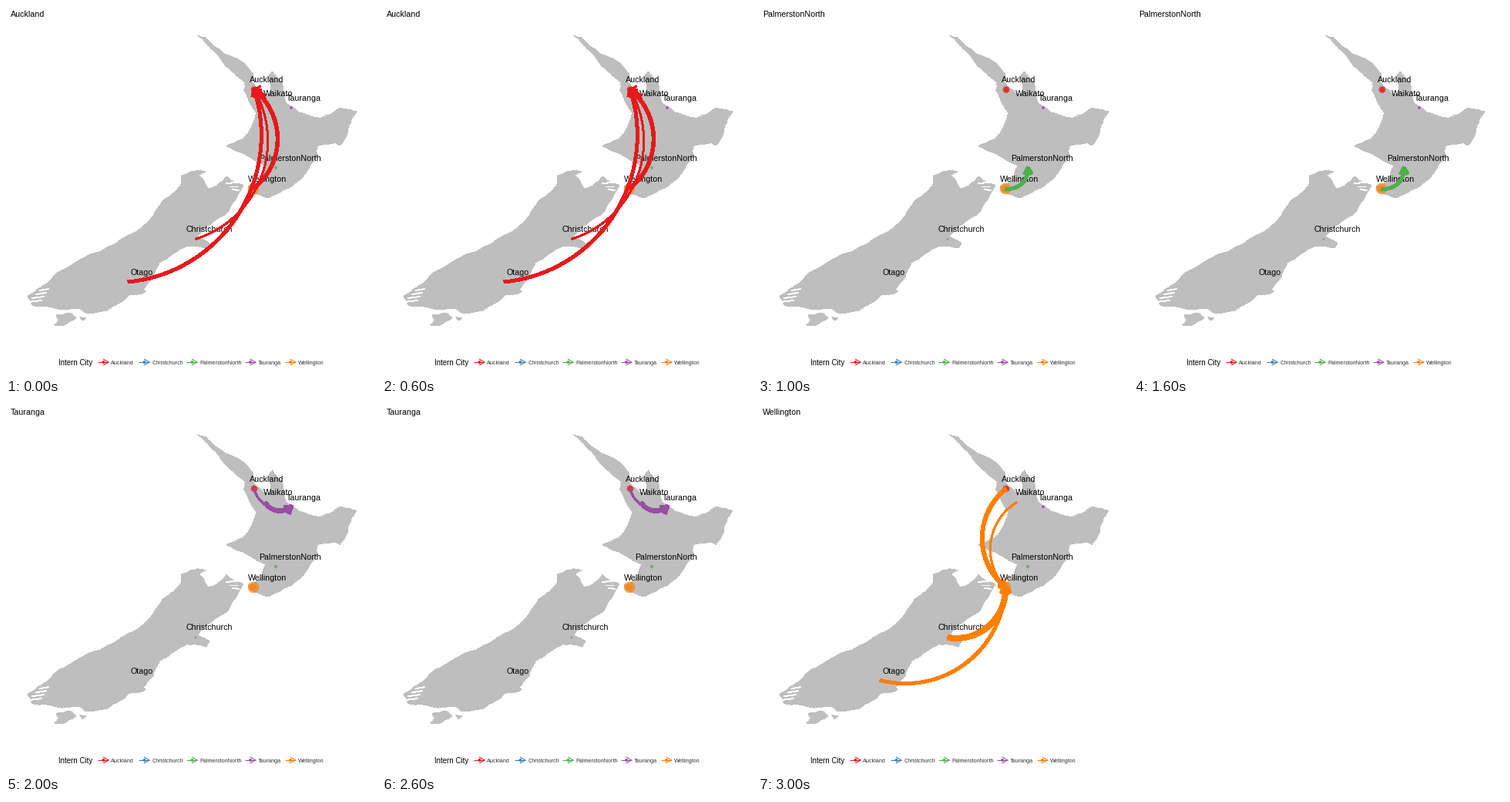
Write a matplotlib script that moves like this. It is 480 px wide and 480 px high and loops after 4000 ms.

```python
import numpy as np
import matplotlib.pyplot as plt
from matplotlib.animation import FuncAnimation
from matplotlib.patches import Circle, Polygon

SIZE = 480
DPI = 96
PT = 72 / DPI  # points per pixel
FONT = "Liberation Sans"
LAND = "#BEBEBE"

COLORS = {
    "Auckland": "#E41A1C",
    "Christchurch": "#377EB8",
    "PalmerstonNorth": "#4DAF4A",
    "Tauranga": "#984EA3",
    "Wellington": "#FF7F00",
}
CITIES = {
    "Auckland": (322, 108.5),
    "Waikato": (336, 126),
    "Tauranga": (370, 132),
    "PalmerstonNorth": (350, 210),
    "Wellington": (321, 237),
    "Christchurch": (246, 302.3),
    "Otago": (158, 358),
}
# left edge and baseline of each city name
LABELS = {
    "Auckland": (315.5, 99.3),
    "Waikato": (334, 117),
    "Tauranga": (364, 123.3),
    "PalmerstonNorth": (328, 201),
    "Wellington": (314, 228),
    "Christchurch": (233, 292.8),
    "Otago": (162, 349.3),
}
# radii of the stacked translucent dots
DOTS = {
    "Auckland": (4.5, 3.2),
    "Christchurch": (1.2,),
    "PalmerstonNorth": (2, 1.2),
    "Tauranga": (2, 1.5),
    "Wellington": (7.3, 4),
}
# destination, then (origin, line width)
SCENES = [
    ("Auckland", [("Otago", 4), ("Christchurch", 2),
                  ("Wellington", 4.5), ("Waikato", 2)]),
    ("PalmerstonNorth", [("Wellington", 4)]),
    ("Tauranga", [("Auckland", 2), ("Waikato", 5)]),
    ("Wellington", [("Auckland", 5), ("Waikato", 2),
                    ("Christchurch", 7), ("Otago", 4)]),
]

NORTH = [
    (248, 38), (259, 41), (270, 52), (296, 67), (311, 77), (321, 88),
    (319, 98), (335, 114), (343, 115), (341, 90), (346, 85), (358, 99),
    (363, 125), (380, 138), (409, 145), (433, 132), (455, 137), (445, 155),
    (443, 165), (433, 181), (428, 178), (403, 182), (404, 194), (390, 215),
    (372, 233), (341, 249), (316, 240), (314, 234), (330, 226), (337, 207),
    (318, 197), (286, 182), (308, 172), (319, 156), (325, 139), (309, 110),
    (310, 99), (283, 75),
]
SOUTH = [
    (249, 213), (259, 215), (250, 219), (262, 237), (274, 233), (286, 221),
    (308, 233), (300, 247), (289, 266), (262, 285), (248, 299), (264, 308),
    (260, 314), (235, 311), (199, 333), (191, 352), (178, 367), (181, 371),
    (160, 375), (131, 395), (103, 398), (95, 392), (72, 394), (34, 388),
    (28, 376), (45, 365), (68, 345), (104, 325), (149, 303), (187, 277),
    (203, 253), (226, 234), (228, 220),
]
STEWART = [(63, 414), (69, 408), (65, 401), (84, 398), (91, 405), (73, 415)]
ISLET = [(95, 403), (104, 405), (99, 408)]


def roughen(points, rng, rounds=3, amount=0.07):
    """Add small coastal wiggles by displacing segment midpoints."""
    points = np.array(points, float)
    for _ in range(rounds):
        step = np.roll(points, -1, axis=0) - points
        normal = np.column_stack((-step[:, 1], step[:, 0]))
        bump = rng.uniform(-amount, amount, (len(points), 1))
        mids = points + step / 2 + normal * bump
        points = np.stack((points, mids), axis=1).reshape(-1, 2)
    return points


rng = np.random.default_rng(4)
COAST = [roughen(shape, rng) for shape in (NORTH, SOUTH, STEWART, ISLET)]
FIORDS = [[(29 + 5 * i, 384 - 5 * i), (46 + 3 * i, 382 - 5 * i)]
          for i in range(4)]
SOUNDS = [[(286 + 4 * i, 230 + 4 * i), (300 + i, 229 + 5 * i)]
          for i in range(3)]


def place(points, squeeze):
    """Press the map towards its foot by `squeeze` pixels at the top."""
    points = np.array(points, float)
    points[..., 1] += squeeze * (415 - points[..., 1]) / 377
    return points


def arc(start, end, bulge=0.24):
    """Circular arc whose sagitta is `bulge` times the chord."""
    chord = end - start
    normal = np.array([-chord[1], chord[0]])
    half = 2 * np.arctan(2 * bulge)
    angle = np.linspace(-half, half, 60)
    along = np.sin(angle) / (2 * np.sin(half))
    out = (np.cos(angle) - np.cos(half)) / (2 * np.sin(half))
    return (start + end) / 2 + np.outer(along, chord) + np.outer(out, normal)


def stroke(points, color, width, smooth=False):
    x, y = np.transpose(points)
    ax.plot(x, y, color=color, lw=width * PT, antialiased=smooth, zorder=4,
            solid_capstyle="butt", solid_joinstyle="round")


def arrow(path, color, width, length=9.6, smooth=False):
    stroke(path, color, width, smooth)
    tip = path[-1]
    dx, dy = path[-1] - path[-2]
    heading = np.arctan2(dy, dx)
    left, right = (
        tip - length * np.array([np.cos(heading + a), np.sin(heading + a)])
        for a in (-np.pi / 6, np.pi / 6))
    stroke([left, tip, right], color, width, smooth)


def write(x, y, text, size=10.6, color="black"):
    ax.text(x, y, text, fontsize=size * PT, family=FONT, color=color,
            va="baseline", zorder=3)


def draw_map(squeeze):
    for shape in COAST:
        ax.add_patch(Polygon(place(shape, squeeze), fc=LAND, ec="none",
                             antialiased=False, zorder=1))
    for inlet in FIORDS + SOUNDS:
        x, y = place(inlet, squeeze).T
        ax.plot(x, y, color="white", lw=PT, antialiased=False, zorder=1.5)
    for city, radii in DOTS.items():
        for radius in radii:
            ax.add_patch(Circle(place(CITIES[city], squeeze), radius,
                                fc=COLORS[city], ec="none", alpha=0.65,
                                zorder=2))
    for city, spot in LABELS.items():
        write(*place(spot, squeeze), city)


def draw_legend():
    write(68, 466, "Intern City", 9.7)
    for x, (city, color) in zip((119, 172, 234, 309.5, 361.5),
                                COLORS.items()):
        arrow(np.array([(x, 462), (x + 14, 462)]), color, 1.1, 8, True)
        ax.add_patch(Circle((x + 7.5, 462), 1.9, fc=color, ec="none",
                            zorder=5))
        write(x + 17.3, 465, city, 7.3, "#333333")


def draw(index):
    ax.clear()
    ax.set(xlim=(0, SIZE), ylim=(SIZE, 0))
    ax.axis("off")
    target, routes = SCENES[index % len(SCENES)]
    # a title with a descender takes a little height from the map
    squeeze = 1.7 if "g" in target else 0
    write(6, 14, target)
    draw_map(squeeze)
    end = place(CITIES[target], squeeze)
    for origin, width in routes:
        arrow(arc(place(CITIES[origin], squeeze), end), COLORS[target], width)
    draw_legend()
    return []


fig = plt.figure(figsize=(SIZE / DPI, SIZE / DPI), dpi=DPI, facecolor="white")
ax = fig.add_axes([0, 0, 1, 1])
animation = FuncAnimation(fig, draw, frames=len(SCENES), interval=1000,
                          init_func=lambda: draw(0), repeat=True)
plt.show()
```
